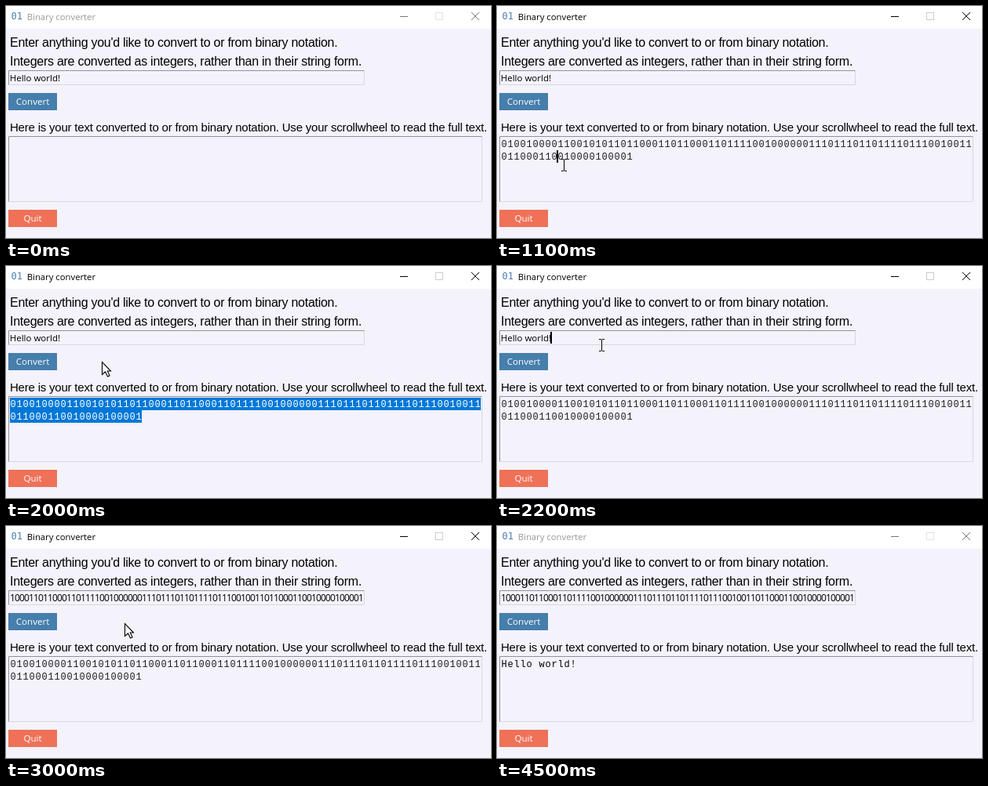
Write an HTML page with a canvas that moves like this. It is 618 px wide and 296 px high and loops after 4.6 s.

```html
<!DOCTYPE html>
<html lang="en">
<head>
<meta charset="utf-8">
<title>Binary converter</title>
<style>
  html, body { margin: 0; width: 100%; height: 100%; overflow: hidden; background: #f4f2fb; }
  canvas { display: block; }
</style>
</head>
<body>
<canvas id="stage" width="618" height="296"></canvas>
<script>
const ctx = document.getElementById('stage').getContext('2d');
const LOOP = 4600, STEP = 100;
const SANS = '"Liberation Sans", Arial, sans-serif';
const UI = '"Open Sans", "Noto Sans", sans-serif';
const MONO = '"Liberation Mono", "Courier New", monospace';
const CODE = '"DejaVu Sans Mono", monospace';
const BG = '#f4f2fb', SELECT = '#0078d7';

const greeting = 'Hello world!';
const bits = [...greeting].map(c => c.charCodeAt(0).toString(2).padStart(8, '0')).join('');
const COLS = 75;

const input = { x: 3, y: 82, w: 454, h: 19 };
const output = { x: 3, y: 166, w: 604, h: 84 };

// Moments when the interface state changes, in ms
const at = {
  focus: 500, convert: 600, caret: 1000, selectOut: 1200, clickInput: 2100,
  selectIn: 2500, paste: 2600, convertBack: 3700, blur: 4400
};

// Pointer way-points: time, x, y
const path = [
  [100, 22, 278], [200, 31, 222], [300, 43, 160], [400, 49, 129], [600, 49, 129],
  [800, 64, 162], [1000, 85, 202], [1600, 85, 202], [1800, 100, 165],
  [2100, 133, 100], [2600, 133, 100], [2800, 146, 117], [3000, 151, 124],
  [3300, 62, 124], [3400, 44, 123], [3700, 44, 123], [3900, 52, 200], [4100, 60, 297]
];

function rect(x, y, w, h, color) {
  ctx.fillStyle = color;
  ctx.fillRect(x, y, w, h);
}

function text(str, x, y, size, family, color = '#000', align = 'left', tracking = 0) {
  ctx.font = `${size}px ${family}`;
  ctx.textAlign = align;
  ctx.letterSpacing = `${tracking}px`;
  ctx.fillStyle = color;
  ctx.fillText(str, x, y);
  ctx.letterSpacing = '0px';
}

const label = (str, y, size, tracking) => text(str, 5, y, size, SANS, '#000', 'left', tracking);

// Digits and letters on an 8 px grid
const mono = (str, y, color) => text(str, 5.4, y, 12, MONO, color, 'left', .8);

function line(points, color) {
  ctx.beginPath();
  points.forEach(([x, y]) => ctx.lineTo(x, y));
  ctx.strokeStyle = color;
  ctx.lineWidth = 1;
  ctx.stroke();
}

function sunken({ x, y, w, h }) {
  const l = x + .5, t = y + .5, r = x + w - .5, b = y + h - .5;
  line([[l, b], [r, b], [r, t]], '#d9d7df');
  line([[l, b], [l, t], [r, t]], '#92909a');
}

function button(caption, y, color) {
  rect(3, y, 62, 22, color);
  text(caption, 34, y + 15, 11.6, UI, '#fff', 'center');
}

function titleBar(active) {
  const ink = active ? '#000' : '#777';
  rect(0, 0, 618, 29, '#fff');
  text('01', 6.5, 17, 12, CODE, '#4a7fae');
  text('Binary converter', 26.7, 18, 11.3, UI, active ? '#000' : '#999');
  line([[502, 13.5], [512, 13.5]], ink);
  ctx.strokeStyle = active ? '#ccc' : '#e2e2e2';
  ctx.strokeRect(547.5, 8.5, 9, 9);
  line([[593, 8], [603, 18]], ink);
  line([[603, 8], [593, 18]], ink);
}

function drawInput(t) {
  sunken(input);
  if (t >= at.paste) {
    ctx.save();
    ctx.beginPath();
    ctx.rect(input.x + 1, input.y + 1, input.w - 2, input.h - 2);
    ctx.clip();
    text(bits.slice(-COLS), 5, 96, 12, UI, '#000', 'left', -.86);
    ctx.restore();
    return;
  }
  const selected = t >= at.selectIn;
  if (selected) rect(5, 84, 65, 15, SELECT);
  text(greeting, 4.7, 96, 11.5, UI, selected ? '#fff' : '#000');
  if (t >= at.clickInput && !selected) rect(68, 84, 2, 15, '#000');
}

function drawOutput(t) {
  sunken(output);
  if (t < at.convert) return;
  if (t >= at.convertBack) {
    mono(greeting, 180, '#000');
    return;
  }
  const selected = t >= at.selectOut && t < at.clickInput;
  [bits.slice(0, COLS), bits.slice(COLS)].forEach((row, i) => {
    if (selected) rect(5, 168 + 16 * i, row.length * 8, 16, SELECT);
    mono(row, 180 + 16 * i, selected ? '#fff' : '#222');
  });
  if (t >= at.caret && t < at.selectOut) rect(76, 184, 2, 16, '#000');
}

function pointerAt(t) {
  const i = path.findIndex(p => p[0] > t);
  if (i < 1) return null;
  const [t0, x0, y0] = path[i - 1], [t1, x1, y1] = path[i];
  const k = (t - t0) / (t1 - t0);
  return { x: Math.round(x0 + (x1 - x0) * k), y: Math.round(y0 + (y1 - y0) * k) };
}

const inside = (p, b) => p.x >= b.x && p.x <= b.x + b.w && p.y >= b.y && p.y <= b.y + b.h;

function beam({ x, y }) {
  rect(x, y - 6, 1, 14, '#000');
  for (const end of [y - 7, y + 8]) {
    rect(x - 3, end, 3, 1, '#000');
    rect(x + 1, end, 3, 1, '#000');
  }
}

function arrow({ x, y }) {
  const shape = [[0, 0], [0, 16], [4, 12.5], [7, 18.5], [9.5, 17.5], [6.8, 11.5], [11, 11.5]];
  ctx.beginPath();
  shape.forEach(([dx, dy]) => ctx.lineTo(x + dx + .5, y + dy + .5));
  ctx.closePath();
  ctx.fillStyle = '#fff';
  ctx.fill();
  ctx.strokeStyle = '#000';
  ctx.lineWidth = 1.1;
  ctx.stroke();
}

function draw(t) {
  rect(0, 0, 618, 296, BG);
  titleBar(t >= at.focus && t < at.blur);
  label("Enter anything you'd like to convert to or from binary notation.", 52, 16, -.28);
  label('Integers are converted as integers, rather than in their string form.', 76, 16, -.26);
  drawInput(t);
  button('Convert', 111, '#467eac');
  label('Here is your text converted to or from binary notation. Use your scrollwheel to read the full text.',
    160, 15, -.21);
  drawOutput(t);
  button('Quit', 260, '#ee7158');
  const p = pointerAt(t);
  if (p) (inside(p, input) || inside(p, output) ? beam : arrow)(p);
}

const start = performance.now();
function tick() {
  const t = (performance.now() - start) % LOOP;
  draw(Math.floor(t / STEP) * STEP);
  requestAnimationFrame(tick);
}
tick();
</script>
</body>
</html>
```
